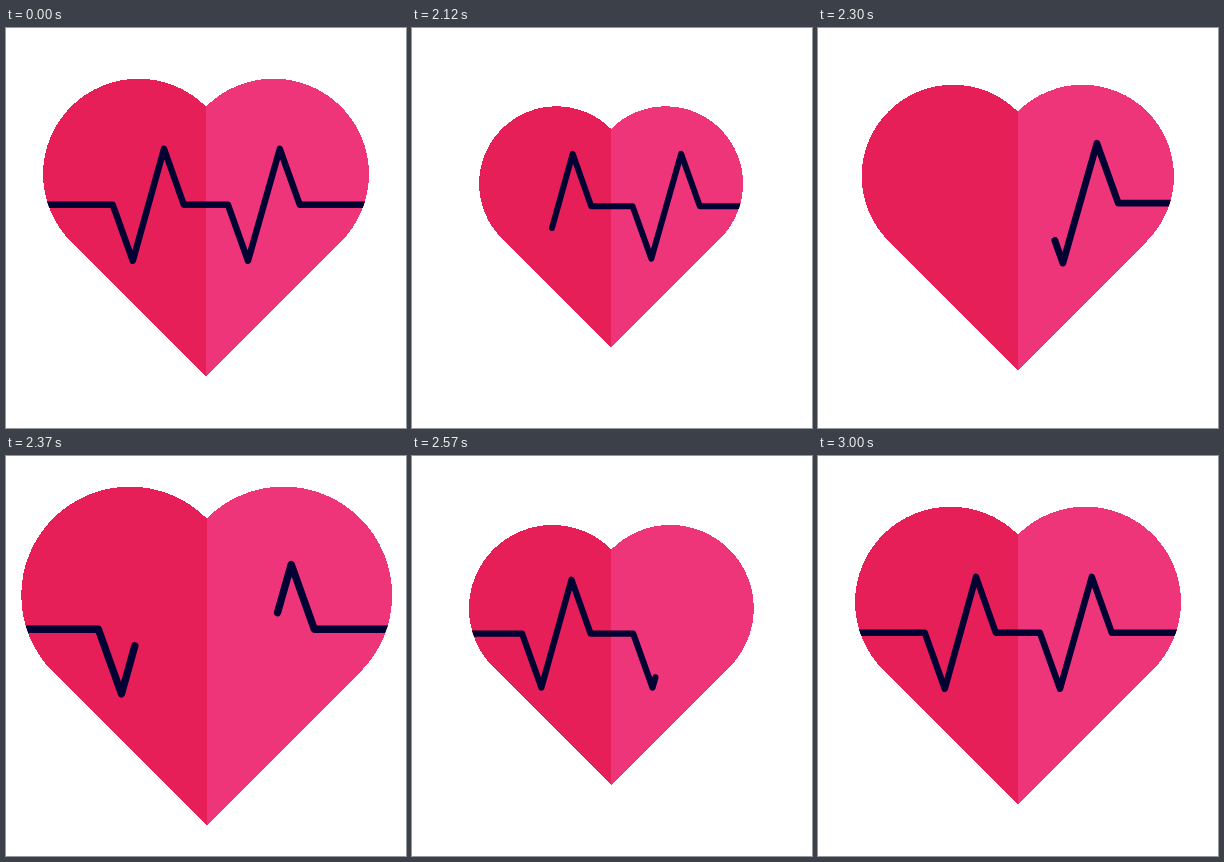
Recreate the animation shown at these times as an HTML page. Size 400 by 400 pixels, loop 3020 ms.

```html
<!DOCTYPE html>
<html lang="en">
<head>
<meta charset="utf-8">
<title>Heartbeat</title>
<style>
  html, body { margin: 0; width: 100%; height: 100%; overflow: hidden; background: #fff; }
  svg { display: block; width: 100%; height: 100%; }
  .half { shape-rendering: crispEdges; }
  .pulse { fill: none; stroke: #020032; stroke-width: 6.4; stroke-linecap: round; stroke-linejoin: round; }
</style>
</head>
<body>
<svg viewBox="0 0 400 400">
  <defs>
    <path id="left" d="M200 348.6L65 213.6A95 95 0 0 1 200 78.6Z"/>
    <path id="right" d="M200 348.6L335 213.6A95 95 0 0 0 200 78.6Z"/>
    <clipPath id="inside">
      <use class="beat" href="#left"/>
      <use class="beat" href="#right"/>
    </clipPath>
    <clipPath id="outBox"><rect/></clipPath>
    <clipPath id="inBox"><rect/></clipPath>
  </defs>
  <g class="beat half">
    <use href="#left" fill="#e61f59"/>
    <use href="#right" fill="#ef3579"/>
  </g>
  <g clip-path="url(#inside)">
    <g id="wave">
      <path id="out" class="pulse" clip-path="url(#outBox)"/>
      <path id="in" class="pulse" clip-path="url(#inBox)"/>
    </g>
  </g>
</svg>
<script>
const LOOP = 3020, REST = 2000, STEP = 25;
const $ = s => document.querySelector(s);
const beats = document.querySelectorAll('.beat');

// [seconds, scale]
const heartKeys = [[0, 1], [.21, .712], [.375, 1.138], [.5, .868], [1, 1]];
const waveKeys = [[0, 1], [.2, .91], [.37, 1.155], [.6, .96], [1, 1]];

const points = [[38, 176.8], [106.8, 176.8], [126.8, 232.8], [158, 120.8], [177.8, 176.8],
  [222, 176.8], [242, 232.8], [273.8, 120.8], [293.8, 176.8], [362, 176.8]];
const lengths = points.slice(1).map((p, i) => Math.hypot(p[0] - points[i][0], p[1] - points[i][1]));
const total = lengths.reduce((a, b) => a + b);

// cubic-bezier(.42, 0, .58, 1)
function easeInOut(x) {
  let lo = 0, hi = 1, u = .5;
  for (let i = 0; i < 24; i++) {
    u = (lo + hi) / 2;
    const bx = 3 * u * (1 - u) * (.42 * (1 - u) + .58 * u) + u ** 3;
    if (bx < x) lo = u; else hi = u;
  }
  return u * u * (3 - 2 * u);
}

function valueAt(keys, t) {
  const i = Math.max(1, keys.findIndex(k => t <= k[0]));
  const [t0, a] = keys[i - 1], [t1, b] = keys[i];
  return a + (b - a) * easeInOut((t - t0) / (t1 - t0));
}

// The part of the polyline between two distances along it
function trim(from, to) {
  const part = [];
  let start = 0;
  lengths.forEach((len, i) => {
    const a = Math.max(from, start), b = Math.min(to, start + len);
    if (a < b) {
      const at = d => points[i].map((v, j) => v + (points[i + 1][j] - v) * (d - start) / len);
      if (!part.length) part.push(at(a));
      part.push(at(b));
    }
    start += len;
  });
  return part;
}

// A trace shows only within its own bounds plus a tenth, so a flat one vanishes
function drawTrace(id, part) {
  const xs = part.map(p => p[0]), ys = part.map(p => p[1]);
  const x = Math.min(...xs), y = Math.min(...ys);
  const w = Math.max(...xs) - x, h = Math.max(...ys) - y;
  const shown = part.length > 1 && h > .01;
  const path = $('#' + id);
  path.style.display = shown ? '' : 'none';
  if (!shown) return;
  path.setAttribute('d', 'M' + part.join('L'));
  const box = { x: x - w / 10, y: y - h / 10, width: w * 1.2, height: h * 1.2 };
  const rect = $(`#${id}Box rect`);
  for (const k in box) rect.setAttribute(k, box[k]);
}

const scaleAt = (s, x, y) => `translate(${x} ${y}) scale(${s}) translate(${-x} ${-y})`;

function render(ms) {
  const step = Math.floor((Math.floor(ms / 10) * 10 - REST + 5) / STEP);
  const t = Math.min(40, Math.max(0, step)) * STEP / 1000;
  const beat = scaleAt(valueAt(heartKeys, t), 195, 196);
  beats.forEach(el => el.setAttribute('transform', beat));
  $('#wave').setAttribute('transform', scaleAt(valueAt(waveKeys, t), 200, 200));
  drawTrace('out', trim(t ? 3 + 1274 * t : 0, total));
  drawTrace('in', t > .31 ? trim(0, 1236 * t - 292) : []);
}

function tick() {
  render(performance.now() % LOOP);
  requestAnimationFrame(tick);
}
tick();
</script>
</body>
</html>
```
